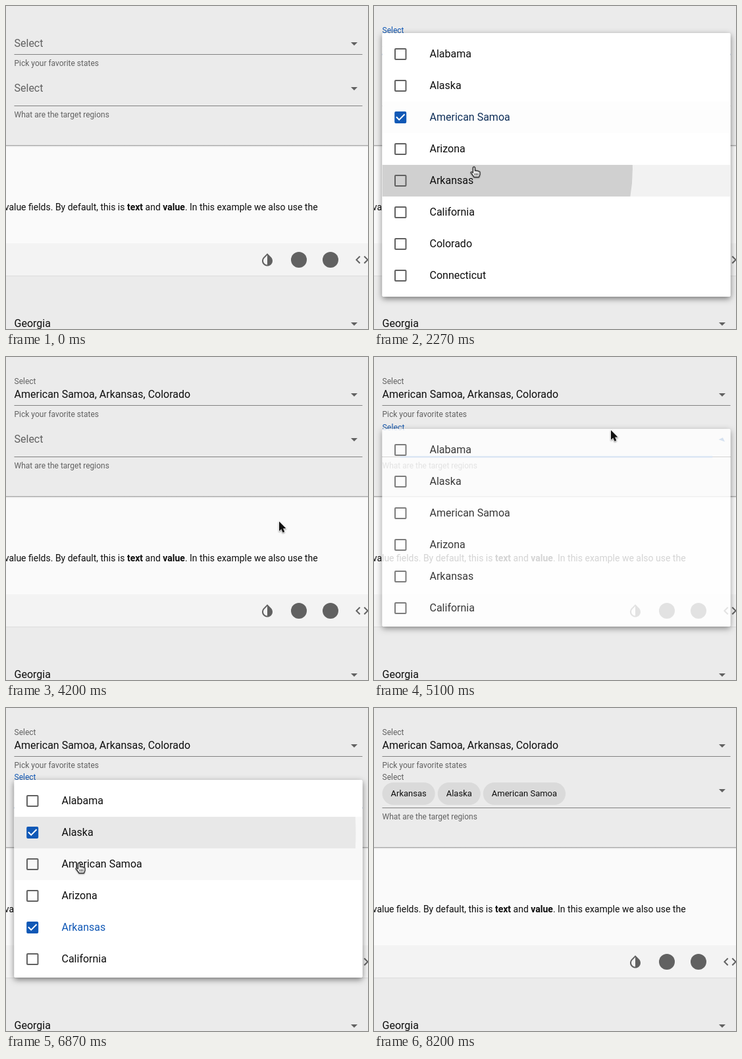
Animation, 550 px wide and 490 px high, one loop 9.37 s. Source, as an HTML page with a canvas:

```html
<!DOCTYPE html>
<html lang="en">
<head>
<meta charset="utf-8">
<title>Multiple select</title>
<style>
  html, body { margin: 0; width: 100%; height: 100%; overflow: hidden; background: #fafafa; }
  canvas { display: block; width: 550px; height: 490px; }
</style>
</head>
<body>
<canvas id="stage"></canvas>
<script>
const LOOP = 9370, WIDTH = 550, HEIGHT = 490;
const LEFT = 12.5, FIELD_WIDTH = 529, ROW = 48;
const INK = [14, 14, 14], GREY = [97, 97, 97], ICON = [97, 97, 97], BLUE = [16, 88, 182];
const STATES = ['Alabama', 'Alaska', 'American Samoa', 'Arizona', 'Arkansas',
  'California', 'Colorado', 'Connecticut'];

const canvas = document.getElementById('stage');
const ctx = canvas.getContext('2d');
const scale = window.devicePixelRatio || 1;
canvas.width = WIDTH * scale;
canvas.height = HEIGHT * scale;

// Clicks are [row, time, x, y]; hovers are [row, from, to].
const fields = [
  {
    y: 57, lineY: 73, labelY: 36.8, hintY: 87, hint: 'Pick your favorite states',
    menuY: 41, menuHeight: 400, rows: 8, open: 700, close: 3600, hover: [60, 900],
    clicks: [[2, 1770, 170, 175], [4, 2160, 152, 248], [6, 3070, 138, 363]],
    hovers: [[0, 850, 1050], [1, 1050, 1250], [2, 1250, 2100], [4, 2100, 2620], [6, 2680, 3560]]
  },
  {
    y: 125, lineY: 151, labelY: 104.8, hintY: 165, hint: 'What are the target regions', chips: true,
    menuY: 109, menuHeight: 300, rows: 6, open: 4970, close: 7850, hover: [4200, 5100],
    clicks: [[4, 5950, 130, 333], [1, 6625, 112, 190], [2, 7100, 111, 239]],
    hovers: [[4, 5700, 6350], [1, 6420, 6770], [2, 6780, 7620]]
  }
];

// Pointer paths as [time, x, y]; the pointer is absent between them.
const paths = [
  [[30, 262, 25], [330, 230, 48], [760, 230, 48], [1400, 170, 171], [1770, 170, 171],
    [2130, 152, 244], [2400, 152, 244], [2700, 142, 347], [2900, 138, 362], [3300, 138, 362], [3420, 20, 352]],
  [[4030, 470, 388], [4370, 360, 111], [5110, 360, 111], [5850, 130, 330], [6200, 130, 330],
    [6520, 112, 187], [6680, 112, 187], [6850, 111, 235], [7500, 111, 235], [7680, 30, 300]]
];

const clamp = v => Math.max(0, Math.min(1, v));
const ramp = (t, start, length) => clamp((t - start) / length);
const easeOut = (v, power = 3) => 1 - (1 - v) ** power;
const smooth = v => v * v * (3 - 2 * v);
const mix = (a, b, k) => a + (b - a) * k;
const mixColor = (a, b, k) => a.map((v, i) => mix(v, b[i], k));
const rgb = c => `rgb(${c.map(Math.round).join(',')})`;

// Centres text on y, with the baseline on a whole pixel.
function text(string, x, y, size, color, weight = 400) {
  ctx.font = `${weight} ${size}px Roboto, sans-serif`;
  ctx.fillStyle = rgb(color);
  ctx.fillText(string, x, Math.floor(y + size * 0.35));
  return x + ctx.measureText(string).width;
}

function box(x, y, w, h, color) {
  ctx.fillStyle = color;
  ctx.fillRect(x, y, w, h);
}

function roundBox(x, y, w, h, r) {
  ctx.beginPath();
  ctx.roundRect(x, y, w, h, r);
}

function disc(x, y, r, color) {
  ctx.beginPath();
  ctx.arc(x, y, r, 0, 2 * Math.PI);
  ctx.fillStyle = color;
  ctx.fill();
}

function withAlpha(alpha, draw) {
  ctx.save();
  ctx.globalAlpha *= alpha;
  draw();
  ctx.restore();
}

function shape(path, x, y, color) {
  ctx.save();
  ctx.translate(x, y);
  ctx.fillStyle = color;
  ctx.fill(path);
  ctx.restore();
}

const drop = new Path2D('M17.66 7.93L12 2.27 6.34 7.93c-3.12 3.12-3.12 8.19 0 11.31C7.9 20.8 9.95 21.58 12 21.58c2.05 0 4.1-.78 5.66-2.34 3.12-3.12 3.12-8.19 0-11.31zM12 19.59c-1.6 0-3.11-.62-4.24-1.76C6.62 16.69 6 15.19 6 13.59s.62-3.11 1.76-4.24L12 5.1v14.49z');
const brackets = new Path2D('M9.4 16.6L4.8 12l4.6-4.6L8 6l-6 6 6 6zM14.6 16.6l4.6-4.6-4.6-4.6L16 6l6 6-6 6z');
const triangle = new Path2D('M-5-2H5L0 3z');
const arrowPointer = new Path2D('M0 0V14.5L3.3 11.4 5.6 16.7 8.2 15.6 5.9 10.4H10.4Z');
const handPointer = new Path2D('M-1.6 1Q0-1.2 1.5 1V6Q3.2 4.6 4.3 6.3 6 5.3 6.8 7 9 6.4 9 8.5V11.5L7.5 15.5H0L-2.5 12-5 8.8Q-4.6 6.5-1.6 9Z');

function dropArrow(y, turn = 0, color = ICON) {
  ctx.save();
  ctx.translate(529, y);
  ctx.rotate(-turn * Math.PI);
  ctx.fillStyle = rgb(color);
  ctx.fill(triangle);
  ctx.restore();
}

function drawPage() {
  box(0, 0, WIDTH, HEIGHT, '#fafafa');
  box(0, 0, WIDTH, 211, '#ebebeb');
  const shade = ctx.createLinearGradient(0, 211, 0, 214);
  shade.addColorStop(0, '#8c8c8c');
  shade.addColorStop(0.5, '#dcdcdc');
  shade.addColorStop(1, '#fafafa');
  box(0, 211, WIDTH, 3, shade);

  const runs = [['value fields. By default, this is '], ['text', 700], [' and '], ['value', 700],
    ['. In this example we also use the']];
  let x = -2.3;
  for (const [run, weight] of runs) x = text(run, x, 305.5, 14, INK, weight);

  box(0, 360, WIDTH, 49, '#f3f3f3');
  box(0, 409, WIDTH, 81, '#ebebeb');
  box(0, 409, WIDTH, 1, '#dcdcdc');
  const icon = rgb(ICON);
  shape(drop, 385, 373, icon);
  disc(445, 385, 12, icon);
  disc(493, 385, 12, icon);
  shape(brackets, 529, 373, icon);
  text('Georgia', LEFT, 482, 16, INK);
  dropArrow(482);
}

const isChecked = (click, t) => t >= click[1] + 150;

function drawChips(names) {
  let x = LEFT;
  for (const name of names) {
    ctx.font = '400 13px Roboto, sans-serif';
    const width = ctx.measureText(name).width + 26;
    roundBox(x, 113, width, 34, 17);
    ctx.fillStyle = '#dadada';
    ctx.fill();
    text(name, x + 13, 130, 13, INK);
    x += width + 4;
  }
}

function drawField(field, t) {
  const opening = easeOut(ramp(t, field.open, 300), 4);
  const focus = opening * (1 - easeOut(ramp(t, field.close, 300)));
  const hover = ramp(t, field.hover[0], 300) * (1 - ramp(t, field.hover[1], 300));
  const accent = mixColor(GREY, BLUE, focus);
  const names = field.clicks.filter(c => isChecked(c, t)).map(c => STATES[c[0]]);

  text('Select', LEFT, mix(field.y, field.labelY, opening), mix(16, 12, opening), accent);
  if (field.chips) drawChips(names);
  else text(names.join(', '), LEFT, field.y, 16, INK);
  box(LEFT, field.lineY, FIELD_WIDTH, 1, rgb(mixColor([130, 130, 130], INK, hover)));
  const lineWidth = FIELD_WIDTH * focus;
  box(LEFT + (FIELD_WIDTH - lineWidth) / 2, field.lineY - 0.5, lineWidth, 2, rgb(BLUE));
  dropArrow(field.y, focus, mixColor(ICON, BLUE, focus));
  text(field.hint, LEFT, field.hintY, 12, GREY);
}

function drawCheckbox(y, checked) {
  if (!checked) {
    roundBox(32, y - 8, 16.5, 16, 1);
    ctx.lineWidth = 2;
    ctx.strokeStyle = rgb(ICON);
    ctx.stroke();
    return;
  }
  roundBox(31.2, y - 9, 18, 18, 2);
  ctx.fillStyle = rgb(BLUE);
  ctx.fill();
  ctx.beginPath();
  ctx.moveTo(33.9, y - 0.7);
  ctx.lineTo(38.2, y + 3.6);
  ctx.lineTo(46.5, y - 4.7);
  ctx.lineWidth = 2;
  ctx.strokeStyle = '#fff';
  ctx.stroke();
}

function drawRow(field, row, t) {
  const top = field.menuY + 8 + row * ROW;
  const click = field.clicks.find(c => c[0] === row);
  const color = click ? mixColor(INK, BLUE, ramp(t, click[1] + 420, 180)) : INK;

  for (const [hovered, from, to] of field.hovers) {
    if (hovered !== row) continue;
    withAlpha(ramp(t, from, 180) * (1 - ramp(t, to, 200)),
      () => box(LEFT, top, FIELD_WIDTH, ROW, '#f2f2f2'));
  }
  if (click && t >= click[1]) {
    const [, start, x, y] = click;
    withAlpha(0.15 * (1 - ramp(t, start + 140, 460)) ** 3, () => {
      ctx.beginPath();
      ctx.rect(LEFT, top, FIELD_WIDTH, ROW);
      ctx.clip();
      disc(x, y, FIELD_WIDTH * easeOut(ramp(t, start, 600)), rgb(color));
    });
  }
  drawCheckbox(top + 24, click && isChecked(click, t));
  text(STATES[row], 84.5, top + 24, 16, color);
}

function drawMenu(field, t) {
  const alpha = easeOut(ramp(t, field.open, 300)) * (1 - easeOut(ramp(t, field.close, 300)));
  if (alpha <= 0) return;
  const frame = [LEFT, field.menuY, FIELD_WIDTH, field.menuHeight, 2];
  withAlpha(alpha, () => {
    // The shadow stays outside the panel, so a fading panel is not darkened.
    ctx.save();
    ctx.beginPath();
    ctx.rect(0, 0, WIDTH, HEIGHT);
    ctx.roundRect(...frame);
    ctx.clip('evenodd');
    ctx.shadowColor = 'rgba(0,0,0,.5)';
    ctx.shadowBlur = 10 * scale;
    ctx.shadowOffsetY = 3 * scale;
    roundBox(...frame);
    ctx.fillStyle = '#fff';
    ctx.fill();
    ctx.restore();

    roundBox(...frame);
    ctx.fillStyle = '#fff';
    ctx.fill();
    ctx.clip();
    for (let row = 0; row < field.rows; row++) drawRow(field, row, t);
  });
}

function drawHand() {
  ctx.fillStyle = '#fff';
  ctx.strokeStyle = '#333';
  ctx.lineWidth = 1.3;
  ctx.fill(handPointer);
  ctx.stroke(handPointer);
  ctx.beginPath();
  for (const x of [1.2, 3.5, 5.8]) {
    ctx.moveTo(x, 9.5);
    ctx.lineTo(x, 13);
  }
  ctx.lineWidth = 0.9;
  ctx.stroke();
}

function drawArrow() {
  ctx.strokeStyle = '#fff';
  ctx.lineWidth = 2;
  ctx.stroke(arrowPointer);
  ctx.fillStyle = '#111';
  ctx.fill(arrowPointer);
}

function drawPointer(t) {
  const path = paths.find(p => t >= p[0][0] && t < p[p.length - 1][0]);
  if (!path) return;
  const next = path.findIndex(p => p[0] > t);
  const [t0, x0, y0] = path[next - 1], [t1, x1, y1] = path[next];
  const k = smooth((t - t0) / (t1 - t0));
  const overMenu = fields.some(f => t > f.open + 150 && t < f.close);
  ctx.save();
  ctx.translate(mix(x0, x1, k), mix(y0, y1, k));
  ctx.lineJoin = 'round';
  ctx.shadowColor = 'rgba(0,0,0,.3)';
  ctx.shadowBlur = 2 * scale;
  ctx.shadowOffsetY = scale;
  if (overMenu) drawHand();
  else drawArrow();
  ctx.restore();
}

function draw(now) {
  const t = now % LOOP;
  ctx.setTransform(scale, 0, 0, scale, 0, 0);
  drawPage();
  for (const field of fields) drawField(field, t);
  for (const field of fields) drawMenu(field, t);
  drawPointer(t);
}

let start;
function tick(now) {
  start ??= now;
  draw(now - start);
  requestAnimationFrame(tick);
}
requestAnimationFrame(tick);
</script>
</body>
</html>
```
